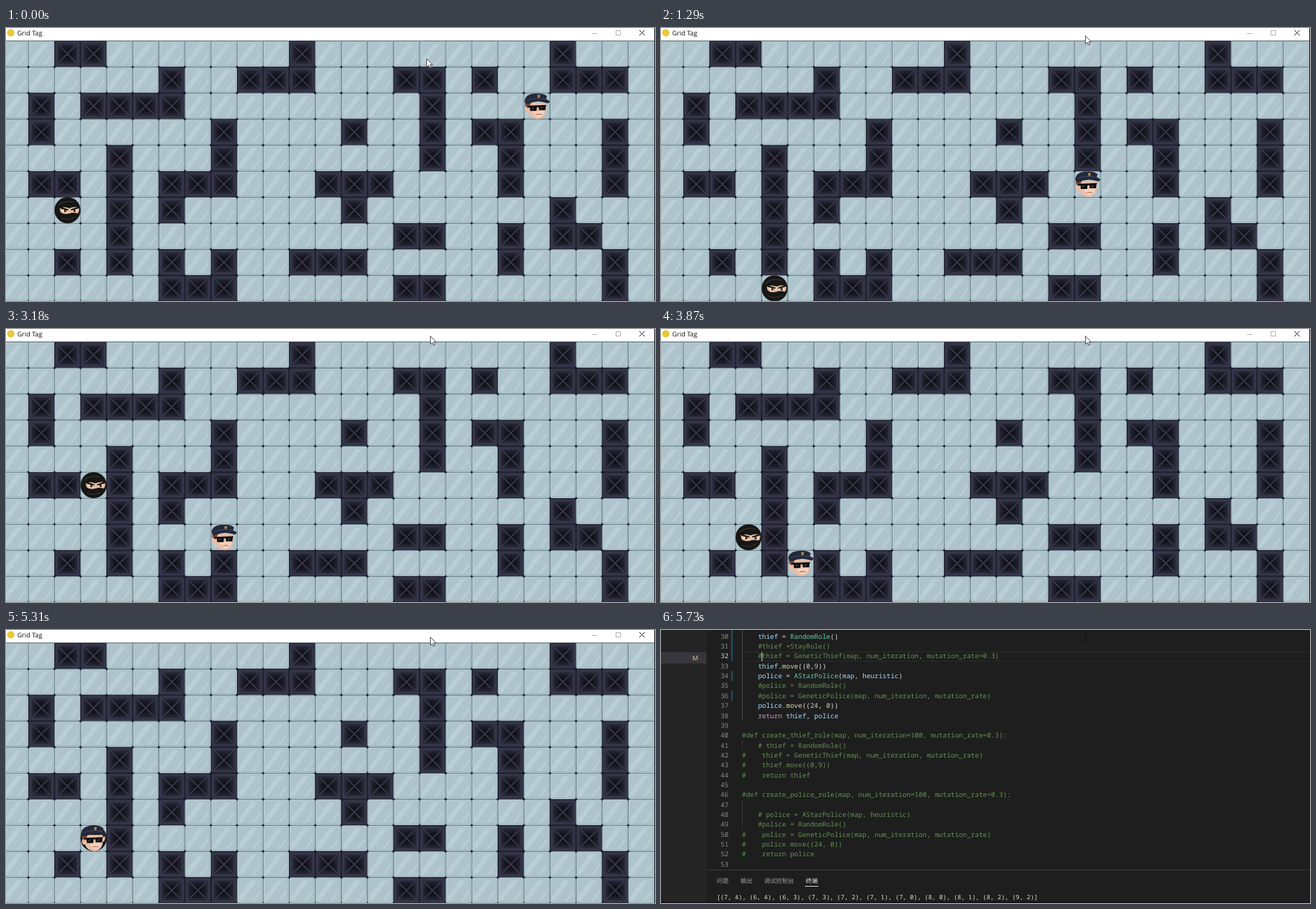
Recreate the animation shown at these times as an HTML page with a canvas. Size 874 px wide and 368 px high, loop 5830 ms.

```html
<!DOCTYPE html>
<html lang="en">
<head>
<meta charset="utf-8">
<title>Grid Tag</title>
<style>
html, body { margin: 0; width: 100%; height: 100%; overflow: hidden; background: #1e1e1e; }
canvas { display: block; }
</style>
</head>
<body>
<canvas id="stage" width="874" height="368"></canvas>
<script>
const W = 874, H = 368, LOOP = 5830, PAD = 6;
const CELL = 35.12, LEFT = -5, TOP = 17.4;
const SANS = '"Open Sans", sans-serif';
const MONO = '"Noto Sans Mono", monospace';
const CJK = '"Noto Sans CJK SC", "Noto Sans CJK", sans-serif';

const MAP = [
  '..##.......#.........#...',
  '......#..###...##.#..###.',
  '.#.####.........#........',
  '.#......#....#..#.##...#.',
  '....#...#.......#..#...#.',
  '.##.#.###...###....#...#.',
  '....#.#......#.......#...',
  '....#..........##..#.##..',
  '..#.#.#.#..###.....#...#.',
  '......###......##......#.'
];

// time, police step, thief step
const MOVES = `120LR 270LD 510LD 660DD 900DR 1020D- 1170L- 1410D- 1560LL 1830LU
1950D- 2190LU 2430L- 2550L- 2820LU 2940LU 3180L- 3330L- 3480L- 3750LD 3870DD
4140DU 4290LL 4530L- 4650LL 4950RR 5070UD 5190-R 5310U-`.split(/\s+/).map(s => {
  const [, t, police, thief] = s.match(/(\d+)(.)(.)/);
  return { t: +t, police, thief };
});
const STEP = { L: [-1, 0], R: [1, 0], U: [0, -1], D: [0, 1], '-': [0, 0] };

// time, x, y
const POINTER = [[0, 566, 41], [120, 567, 36], [270, 568, 28], [390, 570, 20],
  [510, 571, 14], [660, 571, 10], [2430, 571, 9]];

// time, opacity, scale
const CLOSING = [[0, 1, 1], [5460, .87, .994], [5610, .12, .95], [5730, 0, 1]];

function layer(w, h) {
  const c = document.createElement('canvas');
  c.width = w;
  c.height = h;
  return c.getContext('2d');
}
const at = (table, t) => table.filter(row => row[0] <= t).pop();

function rect(g, color, x, y, w, h) {
  g.fillStyle = color;
  g.fillRect(x, y, w, h);
}
function shape(g, color, d) {
  g.fillStyle = color;
  g.fill(new Path2D(d));
}
function stroke(g, color, width, d) {
  g.strokeStyle = color;
  g.lineWidth = width;
  g.stroke(new Path2D(d));
}
function text(g, str, x, y, size, color, family, weight = 400) {
  g.textRendering = 'geometricPrecision';
  g.font = `${weight} ${size}px ${family}`;
  g.fillStyle = color;
  g.fillText(str, x, y);
}
function inCell(g, col, row, draw) {
  g.save();
  g.translate(LEFT + col * CELL, TOP + row * CELL);
  draw(g);
  g.restore();
}

function floor(g) {
  rect(g, '#aec3cb', 0, 0, CELL, CELL);
  shape(g, '#b9ced5', 'M3 25L19 4H27L6 32H3ZM20 32L32 16V20L23 32Z');
  stroke(g, '#bbd0d7', 1, 'M1.5 34V1.5H34');
  stroke(g, '#a3b8c1', 1, 'M2 33.5H33.5V2');
  stroke(g, '#6d8791', 1, 'M0 .3H35.12M.3 0V35.12');
}

function wall(g) {
  rect(g, '#2c2d3d', 0, 0, CELL, CELL);
  stroke(g, '#36374a', 2.4, 'M2.6 2.6H32.5V32.5H2.6Z');
  ['#20212d', '#181922', '#12131a', '#0b0c11'].forEach((color, i) => {
    const d = 5.5 + i * 2.8;
    rect(g, color, d, d, CELL - 2 * d, CELL - 2 * d);
  });
  stroke(g, '#333446', 2.2, 'M5 5L30 30M30 5L5 30');
  stroke(g, '#222331', 1, 'M.5 .5H34.6V34.6H.5Z');
}

function knot(g) {
  shape(g, '#14212a', 'M0-2.6L.8-.8L2.6 0L.8.8L0 2.6L-.8.8L-2.6 0L-.8-.8Z');
}

function thief(g) {
  shape(g, '#171615', 'M0 17.5A17.6 17.6 0 0 1 35.2 17.5A17.6 17.6 0 0 1 0 17.5Z');
  stroke(g, '#34322f', 1.2, 'M5 11Q14 3 27 7M9 28Q18 32 27 27');
  shape(g, '#e6bfa5', 'M7 15Q13 12 20 15Q27 12 33 14Q34 20 31 22Q25 20 20 22Q12 24 8 20Z');
  shape(g, '#171615', 'M8 13L19 16.5L18 18L8 15.5ZM22 16.5L33 12.5V15L23 18Z');
  shape(g, '#fff', 'M10 18Q14 16 17.5 19Q13 21 10 18ZM23 19Q27 16 31 17.5Q28 21 23 19Z');
  shape(g, '#3a2318', 'M13 17H16V20H13ZM25.5 17H28.5V20H25.5Z');
}

function police(g) {
  shape(g, '#744531', 'M2 11H9V22H4Q1 17 2 11Z');
  shape(g, '#e9bda6', 'M5 13H30Q31 22 29 28Q25 35 18 35Q9 34 6 26Q1 26 2 20Q3 17 6 19Z');
  shape(g, '#f3d2bf', 'M12 24H28Q27 31 20 33Q14 31 12 24Z');
  shape(g, '#7c4a34', 'M5 12H10L7 20H4Z');
  shape(g, '#23283a', 'M1 10Q2 2 13 .8Q26-.5 31 4L30 8L35 11Q34 15 29 13Q17 9 5 15Q1 14 1 10Z');
  stroke(g, '#3d4663', 1, 'M4 10Q15 5 30 8.5');
  shape(g, '#b08a48', 'M18 3L20 2.2L22 3Q22 6 20 7Q18 6 18 3Z');
  shape(g, '#0d0d10', 'M5 17L30 16V18H29.5L29 23H20.5L20 19H17.5L17 24H8.5L8 19H5Z');
  stroke(g, '#8f9098', 1, 'M11 21.5L13 19.5M23 21L25 19');
  stroke(g, '#b36f62', 1.2, 'M16 29Q20 28 24 29');
}

function paintBoard() {
  const g = layer(W + 2 * PAD, H + 2 * PAD);
  g.translate(PAD, PAD);
  rect(g, '#fff', -PAD, -PAD, W + PAD, TOP + PAD);
  MAP.forEach((line, r) => [...line].forEach((c, i) => inCell(g, i, r, c === '#' ? wall : floor)));
  for (let r = 1; r <= 10; r++)
    for (let c = 1; c <= 24; c++) inCell(g, c, r, knot);
  rect(g, '#5d6b73', -PAD, 16.8, W + PAD, .6);
  rect(g, '#20252a', 873, 0, 1, H);
  shape(g, '#e9c83c', 'M1.5 6.5A5 5 0 0 1 11.5 6.5A5 5 0 0 1 1.5 6.5Z');
  return g.canvas;
}

const COMMENT = '#629350', NAME = '#a4dcfb', TYPE = '#5ccbb4', FUNC = '#dcdcaa',
  PLAIN = '#dcdcdc', WORD = '#c99bc6', NUM = '#c0d4b4';
const CODE = [
  '    thief = RandomRole()',
  '    #thief =StayRole()',
  '    #thief = GeneticThief(map, num_iteration, mutation_rate=0.3)',
  '    thief.move((0,9))',
  '    police = AStarPolice(map, heuristic)',
  '    #police = RandomRole()',
  '    #police = GeneticPolice(map, num_iteration, mutation_rate)',
  '    police.move((24, 0))',
  '    return thief, police',
  '',
  '#def create_thief_role(map, num_iteration=100, mutation_rate=0.3):',
  '    # thief = RandomRole()',
  '#    thief = GeneticThief(map, num_iteration, mutation_rate)',
  '#    thief.move((0,9))',
  '#    return thief',
  '',
  '#def create_police_role(map, num_iteration=100, mutation_rate=0.3):',
  '',
  '    # police = AStarPolice(map, heuristic)',
  '    #police = RandomRole()',
  '#    police = GeneticPolice(map, num_iteration, mutation_rate)',
  '#    police.move((24, 0))',
  '#    return police',
  ''
];

function tokenColor(token) {
  if (token[0] === '#') return COMMENT;
  if (token === 'return') return WORD;
  if (token === 'move') return FUNC;
  if (/^[A-Z]/.test(token)) return TYPE;
  if (/^\d/.test(token)) return NUM;
  return /^\w/.test(token) ? NAME : PLAIN;
}

function paintEditor() {
  const g = layer(W, H), pitch = 13.35, size = 9.02, first = 30;
  const mid = n => 8.6 + (n - first) * pitch;
  rect(g, '#1e1e1e', 0, 0, W, H);
  rect(g, '#252526', 0, 0, 61, H);
  rect(g, '#37373d', 0, 30, 61, 15);
  text(g, 'M', 42, 40.5, 9, '#b8a57d', SANS, 600);

  rect(g, '#2b2b2b', 109, 29, W, 1);
  rect(g, '#2b2b2b', 109, 41.5, W, 1);
  rect(g, '#484848', 109, 0, 1, 122);
  rect(g, '#363636', 109, 149, 1, 13);
  rect(g, '#363636', 109, 229, 1, 40);
  rect(g, '#1c5568', 94.5, 0, 2, 41.5);
  for (const n of [34, 36]) rect(g, '#1c5568', 94.5, mid(n) - 6.7, 2, pitch);

  CODE.forEach((line, i) => {
    const n = first + i, y = mid(n) + 3.1;
    g.textAlign = 'right';
    text(g, n, 91, y, size, n === 32 ? '#d0d0d0' : '#8a8a8a', MONO);
    g.textAlign = 'left';
    let x = 109;
    for (const token of line.match(/#.*|\w+|\s+|[^\w\s#]+/g) || []) {
      text(g, token, x, y, size, tokenColor(token), MONO, 500);
      x += g.measureText(token).width;
    }
  });
  rect(g, '#e0e0e0', 135.5, 30, 1, 12);

  rect(g, '#363636', 62, 323, W, 1);
  ['问题', '输出', '调试控制台', '终端'].reduce((x, tab) => {
    const active = tab === '终端';
    text(g, tab, x, 341, 8, active ? '#f0f0f0' : '#a0a0a0', CJK, active ? 500 : 400);
    if (active) rect(g, '#d0d0d0', x - 1, 345, 18, 1);
    return x + tab.length * 8 + 16;
  }, 75);
  const path = '(7, 4), (6, 4), (6, 3), (7, 3), (7, 2), (7, 1), (7, 0), (8, 0), (8, 1), (8, 2), (9, 2)';
  text(g, `[${path}]`, 75, 363, 8.2, '#e0e0e0', MONO, 500);
  rect(g, '#180a10', 0, 366.5, W, 2);
  return g.canvas;
}

function arrow(g, x, y) {
  g.save();
  g.translate(x, y);
  const d = 'M.5 .5V11.5L3 9.2L4.8 13L6.6 12.2L4.9 8.6H8.3Z';
  shape(g, '#fff', d);
  stroke(g, '#333', .8, d);
  g.restore();
}

function buttons(g) {
  stroke(g, '#b4b4b4', 1, 'M789 7.5H796M821.5 3.5H827.5V9.5H821.5Z');
  stroke(g, '#222', 1, 'M853 3L860 10M860 3L853 10');
}

const board = paintBoard(), editor = paintEditor();
const win = layer(board.width, board.height);
const stage = document.getElementById('stage').getContext('2d');

function place(t) {
  const pos = { police: [20, 2], thief: [2, 6] };
  for (const move of MOVES) {
    if (move.t > t) break;
    for (const who in pos) {
      const [dx, dy] = STEP[move[who]];
      pos[who][0] += dx;
      pos[who][1] += dy;
    }
  }
  return pos;
}

function draw(t) {
  const [start, alpha, scale] = at(CLOSING, t), open = start === 0;
  stage.drawImage(editor, 0, 0);
  if (alpha) {
    const pos = place(t), cx = W / 2, cy = 130;
    win.setTransform(1, 0, 0, 1, 0, 0);
    win.clearRect(0, 0, board.width, board.height);
    win.drawImage(board, 0, 0);
    win.translate(PAD, PAD);
    text(win, 'Grid Tag', 15, 10, 8.8, '#111', SANS);
    if (open) buttons(win);
    inCell(win, ...pos.thief, thief);
    inCell(win, ...pos.police, police);

    stage.save();
    stage.globalAlpha = alpha;
    stage.translate(cx, cy);
    stage.scale(scale, scale);
    stage.drawImage(win.canvas, -cx - PAD, -cy - PAD);
    stage.restore();
  }
  if (open) {
    const [, x, y] = at(POINTER, t);
    arrow(stage, x, y);
  } else {
    stroke(stage, alpha > .5 ? '#444' : '#121212', 1, 'M570 4.5H574M572 4.5V13.5M570 13.5H574');
  }
}

const begin = performance.now();
function tick() {
  draw((performance.now() - begin) % LOOP);
  requestAnimationFrame(tick);
}
tick();
</script>
</body>
</html>
```
